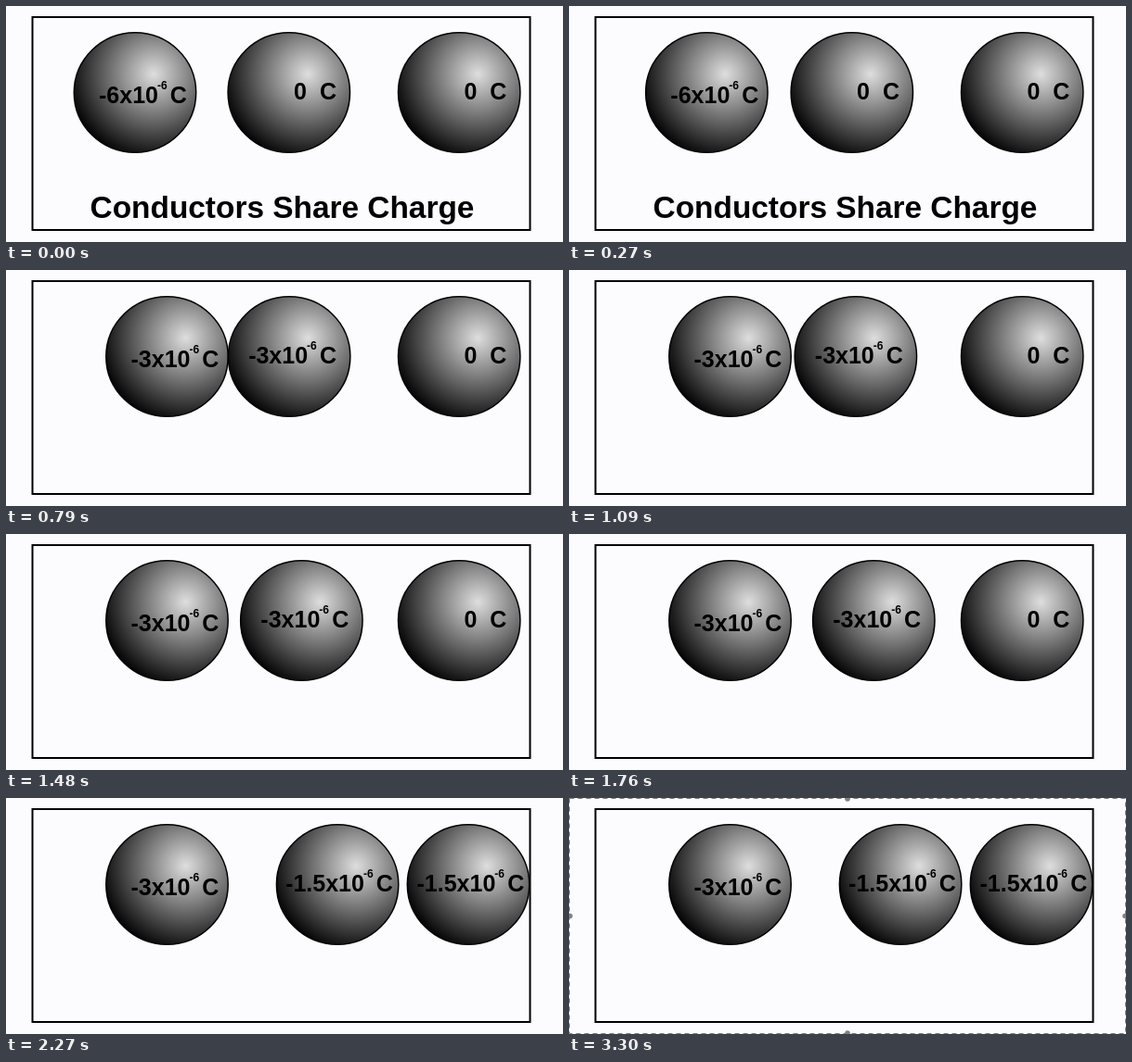
Animation of 600x255 px, one loop 3580 ms. Source, as an HTML page with a canvas:

```html
<!DOCTYPE html>
<html lang="en">
<head>
<meta charset="utf-8">
<title>Conductors Share Charge</title>
<style>
html, body { margin: 0; width: 100%; height: 100%; overflow: hidden; background: #fcfbfe; }
canvas { display: block; }
</style>
</head>
<body>
<canvas id="stage" width="600" height="255"></canvas>
<script>
const ctx = document.getElementById('stage').getContext('2d');
const LOOP = 3580, FIRST_CONTACT = 760, SECOND_CONTACT = 2270, SELECTION = 3300;
const FONT = '"Liberation Sans", Arial, sans-serif';
const LABEL_SIZE = 25;

// Runs of picture updates: first time, last time, number of updates
const RUNS = [[30, 30, 1], [180, 700, 11], [730, 1210, 10], [1270, 1790, 11], [1850, 2270, 10]];

function heldTime(t) {
  let held = 0;
  for (const [from, to, count] of RUNS) {
    if (t < from) break;
    const step = count > 1 ? (to - from) / (count - 1) : 1;
    held = Math.min(to, from + Math.floor((t - from) / step + 0.25) * step);
  }
  return held;
}

function text(str, x, y, size) {
  ctx.font = `bold ${size}px ${FONT}`;
  ctx.fillText(str, x, y);
  return ctx.measureText(str).width;
}

function sphere(x) {
  const y = 93.5;
  const shade = ctx.createRadialGradient(x + 20, y - 20, 0, x + 20, y - 20, 95);
  shade.addColorStop(0, '#dedede');
  shade.addColorStop(1, '#000');
  ctx.beginPath();
  ctx.ellipse(x, y, 65.7, 64.8, 0, 0, Math.PI * 2);
  ctx.fillStyle = shade;
  ctx.fill();
  ctx.lineWidth = 1.5;
  ctx.strokeStyle = '#000';
  ctx.stroke();
  ctx.fillStyle = '#000';
}

function charge(mantissa, x, baseline) {
  const end = x + text(mantissa + 'x10', x, baseline, LABEL_SIZE);
  text('-6', end - 1, baseline - 14.7, 12);
  text('C', end + 12.9, baseline, LABEL_SIZE);
}

function neutral(x) {
  text('0  C', x + 5.3, 101, LABEL_SIZE);
}

function selectionFrame() {
  ctx.strokeStyle = ctx.fillStyle = '#808080';
  ctx.lineWidth = 1;
  ctx.setLineDash([5, 4]);
  ctx.strokeRect(0.5, 0.5, 599, 254);
  ctx.setLineDash([]);
  for (const [x, y] of [[300, 1], [300, 254], [1, 127.5], [599, 127.5]]) {
    ctx.beginPath();
    ctx.arc(x, y, 2.8, 0, Math.PI * 2);
    ctx.fill();
  }
}

function draw(t) {
  const now = heldTime(t);
  const touched = now >= FIRST_CONTACT, shared = now >= SECOND_CONTACT;

  // Each moving sphere accelerates evenly until it touches the next one
  const left = 139 + (touched ? 34.5 : now < 30 ? 0 : (1.37 + 0.00594 * now) ** 2);
  const middle = 304.8 + (shared ? 52.3 : touched ? (0.00447 * (now - 654)) ** 2 : 0);
  const right = shared ? 498 : 488.2;

  ctx.fillStyle = '#fcfbfe';
  ctx.fillRect(0, 0, 600, 255);
  ctx.strokeStyle = '#000';
  ctx.lineWidth = 2;
  ctx.strokeRect(28.5, 12, 536, 230);

  sphere(left);
  charge(touched ? '-3' : '-6', left - 39, 105);

  sphere(middle);
  if (shared) charge('-1.5', middle - 56, 101);
  else if (touched) charge('-3', middle - 44, 101);
  else neutral(middle);

  sphere(right);
  if (shared) charge('-1.5', right - 55.5, 101);
  else neutral(right);

  if (!touched) text('Conductors Share Charge', 90.6, 228.5, 33.4);
  if (t >= SELECTION) selectionFrame();
}

const start = performance.now();
function tick() {
  draw((performance.now() - start) % LOOP);
  requestAnimationFrame(tick);
}
tick();
</script>
</body>
</html>
```
